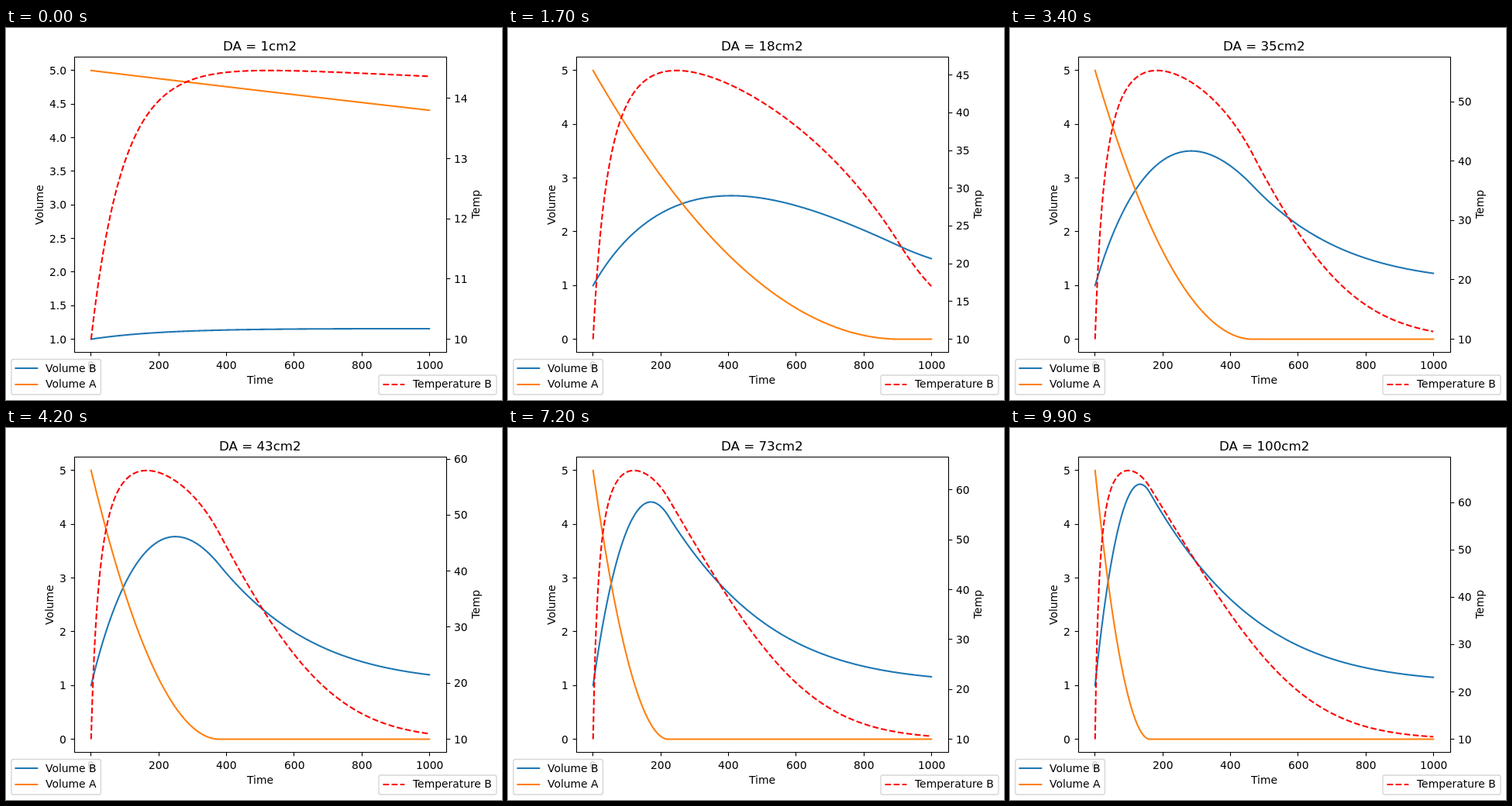
These frames come from a looping animation (640x480 px, 10000 ms). An HTML page with a canvas:

```html
<!DOCTYPE html>
<html lang="en">
<head>
<meta charset="utf-8">
<title>Two tanks</title>
<style>
  html, body { margin: 0; width: 100%; height: 100%; overflow: hidden; background: #fff; }
  canvas { display: block; width: 640px; height: 480px; }
</style>
</head>
<body>
<canvas id="stage" width="640" height="480"></canvas>
<script>
const ctx = document.getElementById('stage').getContext('2d');

const PT = 100 / 72;                       // pixels per point
const BOX = { l: 88, r: 568, t: 37.5, b: 418.9 };
const BLUE = '#1f77b4', ORANGE = '#ff7f0e', RED = '#ff0000';
const FONT = '"DejaVu Sans", Verdana, sans-serif';
const SMALL = 10 * PT, LARGE = 12 * PT;
const DASH = [5.55 * PT, 2.4 * PT];
const TICK = 3.5 * PT, GAP = 7 * PT;
const STEPS = 1000, FRAME_MS = 100, COUNT = 100;

// Hot tank A drains into tank B, which also gets a constant cold inflow.
const FLOW = 2.731e-4, DRAIN_B = 36 * FLOW, COLD = 0.01;
const HOT_T = 90, COLD_T = 10;

function simulate(area) {
  const a = [], b = [], temp = [];
  let va = 5, vb = 1, t = COLD_T;
  for (let i = 0; i < STEPS; i++) {
    a.push(va); b.push(vb); temp.push(t);
    const q = Math.min(va, area * FLOW * Math.sqrt(va));
    t += (q * (HOT_T - t) + COLD * (COLD_T - t)) / vb;
    vb += q + COLD - DRAIN_B * Math.sqrt(vb);
    va -= q;
  }
  return { a, b, temp };
}

// Maps a data range to the plot height with a 5% margin and picks tick values.
function makeAxis(lo, hi) {
  const span = (hi - lo) * 1.1, pad = (hi - lo) * 0.05;
  const raw = span / 9, base = 10 ** Math.floor(Math.log10(raw));
  const step = [1, 2, 2.5, 5, 10].map(m => m * base).find(s => s >= raw);
  const ticks = [];
  for (let i = Math.ceil((lo - pad) / step - 1e-9); i * step <= hi + pad; i++) ticks.push(i * step);
  const digits = Number.isInteger(step) ? 0 : 1;
  return {
    y: v => BOX.b - (v - lo + pad) / span * (BOX.b - BOX.t),
    ticks,
    labels: ticks.map(v => v.toFixed(digits))
  };
}

const plotX = t => BOX.l + (BOX.r - BOX.l) * (1 / 22 + t / (STEPS - 1) / 1.1);
const snap = v => Math.floor(v) + 0.5;

function text(str, x, y, align = 0, size = SMALL) {
  ctx.font = size + 'px ' + FONT;
  ctx.fillStyle = '#000';
  ctx.fillText(str, Math.round(x - ctx.measureText(str).width * align), Math.round(y));
}

function upright(str, x) {
  ctx.save();
  ctx.translate(Math.round(x), Math.round((BOX.t + BOX.b) / 2));
  ctx.rotate(-Math.PI / 2);
  text(str, 0, 0, 0.5);
  ctx.restore();
}

function rule(x1, y1, x2, y2) {
  ctx.beginPath();
  ctx.moveTo(x1, y1);
  ctx.lineTo(x2, y2);
  ctx.stroke();
}

function thinPen() {
  ctx.setLineDash([]);
  ctx.lineCap = 'butt';
  ctx.strokeStyle = '#000';
  ctx.lineWidth = 0.8 * PT;
}

function colourPen(colour, dashed) {
  ctx.setLineDash(dashed ? DASH : []);
  ctx.lineCap = dashed ? 'butt' : 'square';
  ctx.lineJoin = 'round';
  ctx.strokeStyle = colour;
  ctx.lineWidth = 1.5 * PT;
}

function curve(data, axis, colour, dashed) {
  colourPen(colour, dashed);
  ctx.beginPath();
  data.forEach((v, i) => ctx.lineTo(plotX(i), axis.y(v)));
  ctx.stroke();
}

// side: -1 for the left axis, 1 for the right one
function sideTicks(axis, side) {
  const edge = side < 0 ? BOX.l : BOX.r;
  thinPen();
  axis.ticks.forEach((v, i) => {
    const y = axis.y(v);
    rule(edge + 0.5, snap(y), edge + 0.5 + side * TICK, snap(y));
    text(axis.labels[i], edge + side * GAP, y + 5, side < 0 ? 1 : 0);
  });
  ctx.font = SMALL + 'px ' + FONT;
  return Math.max(...axis.labels.map(s => ctx.measureText(s).width));
}

function bottomTicks() {
  thinPen();
  for (let t = 0; t <= 1000; t += 200) {
    const x = plotX(t);
    rule(snap(x), snap(BOX.b), snap(x), snap(BOX.b) + TICK);
    text(String(t), x, 440, 0.5);
  }
  text('Time', (BOX.l + BOX.r) / 2, 459, 0.5);
}

function legend(x, y, w, h, rows) {
  ctx.setLineDash([]);
  ctx.beginPath();
  ctx.roundRect(x, y, w, h, 2 * PT);
  ctx.fillStyle = 'rgba(255,255,255,0.8)';
  ctx.fill();
  ctx.strokeStyle = 'rgba(204,204,204,0.8)';
  ctx.lineWidth = PT;
  ctx.stroke();
  for (const [label, colour, lineY, dashed] of rows) {
    const x1 = x + 0.4 * SMALL;
    colourPen(colour, dashed);
    rule(x1, lineY, x1 + 2 * SMALL, lineY);
    text(label, x1 + 2.8 * SMALL, lineY + (lineY > 450 ? 4 : 5));
  }
}

function draw(area) {
  const { a, b, temp } = simulate(area);
  const vol = makeAxis(Math.min(...a, ...b), Math.max(...a, ...b));
  const heat = makeAxis(Math.min(...temp), Math.max(...temp));

  ctx.fillStyle = '#fff';
  ctx.fillRect(0, 0, 640, 480);

  curve(b, vol, BLUE);
  curve(a, vol, ORANGE);
  bottomTicks();
  const leftW = sideTicks(vol, -1);
  upright('Volume', BOX.l - GAP - leftW - 8.5);

  curve(temp, heat, RED, true);
  const rightW = sideTicks(heat, 1);
  upright('Temp', BOX.r + GAP + rightW + 15.9);

  thinPen();
  ctx.strokeRect(snap(BOX.l), snap(BOX.t), BOX.r - BOX.l, snap(BOX.b) - snap(BOX.t));
  text(`DA = ${area}cm2`, (BOX.l + BOX.r) / 2, 29, 0.5, LARGE);

  legend(6.94, 427.5, 115.5, 45.5, [['Volume B', BLUE, 439], ['Volume A', ORANGE, 460]]);
  legend(481, 448, 152, 25, [['Temperature B', RED, 460, true]]);
}

let shown = 0;
const start = performance.now();

function tick() {
  const elapsed = Math.max(0, performance.now() - start);
  const area = Math.floor(elapsed / FRAME_MS) % COUNT + 1;
  if (area !== shown) {
    shown = area;
    draw(area);
  }
  requestAnimationFrame(tick);
}

tick();
</script>
</body>
</html>
```
